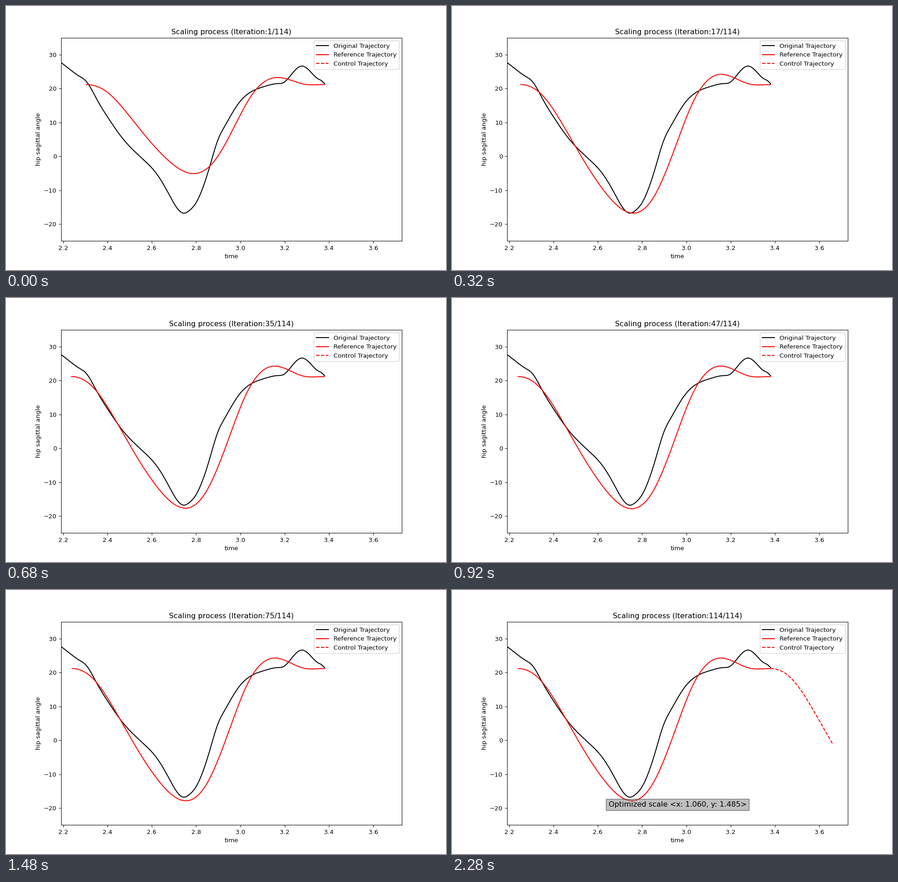
Recreate the animation shown at these times as a matplotlib script. Size 966 by 580 pixels, loop 3.48 s.

```python
import numpy as np
import matplotlib.pyplot as plt
from matplotlib.animation import FuncAnimation

DPI, W, H = 96.6, 966, 580
STEP_MS, FRAMES = 40, 87
TOTAL = 114
BEST = np.array([1.060, 1.485])  # x and y scale the search ends on
LOOK_AHEAD = 0.265               # unscaled seconds shown as control

# Key points (time, angle) of both curves
ORIGINAL = [
    (2.1905, 27.65), (2.275, 23.53), (2.302, 22.25), (2.353, 16.67),
    (2.404, 11.23), (2.466, 5.45), (2.559, -0.79), (2.620, -5.02),
    (2.672, -10.53), (2.715, -15.37), (2.742, -16.78), (2.773, -15.84),
    (2.797, -14.03), (2.830, -9.39), (2.863, -2.74), (2.898, 4.72),
    (2.929, 8.81), (2.991, 15.53), (3.052, 19.16), (3.110, 20.62),
    (3.166, 21.44), (3.196, 21.78), (3.233, 24.33), (3.277, 26.62),
    (3.320, 24.73), (3.349, 22.92), (3.365, 22.38), (3.3805, 21.44),
]
STRIDE = [
    (0, 21.16), (0.0895, 19.15), (0.182, 12.89), (0.2643, 6.19),
    (0.3672, -1.06), (0.4844, -5.12), (0.5667, -2.27), (0.6551, 7.07),
    (0.7477, 18.15), (0.8547, 23.23), (0.9843, 21.27), (1.0758, 21.16),
]


def spline(points, slope0, slope1, n=500):
    """Cubic spline through the points with given end slopes."""
    px, py = np.array(points, float).T
    h = np.diff(px)
    d = np.diff(py) / h
    a, b = np.eye(len(px)), np.zeros(len(px))
    b[0], b[-1] = slope0, slope1
    for i in range(1, len(px) - 1):
        a[i, i - 1:i + 2] = h[i], 2 * (h[i - 1] + h[i]), h[i - 1]
        b[i] = 3 * (h[i] * d[i - 1] + h[i - 1] * d[i])
    m = np.linalg.solve(a, b)

    x = np.linspace(px[0], px[-1], n)
    i = np.clip(np.searchsorted(px, x, "right") - 1, 0, len(h) - 1)
    t = (x - px[i]) / h[i]
    y = (py[i] * (1 + 2 * t) * (1 - t) ** 2 + py[i + 1] * t * t * (3 - 2 * t)
         + h[i] * t * (1 - t) * (m[i] * (1 - t) - m[i + 1] * t))
    return x, y


def settle(best, first, rate, i):
    """Line-search estimate closing in on best after i steps."""
    return best + (first - best) * rate ** i


def scales(it):
    """Scales tried at an iteration: a line search along x, then y, twice."""
    start, found = np.array([1.0, 1.0]), np.array([1.049, 1.475])
    if it == 1:
        return start
    if it <= 12:
        return settle(found[0], 1.236, 0.677, it - 3), start[1]
    if it <= 24:
        return found[0], settle(found[1], 1.236, 0.6, it - 13)
    if it <= 26:
        return 2 * found - start  # extrapolated step
    if it <= 39:
        return settle(BEST[0], 1.236, 0.6, it - 27), 1.478
    return BEST[0], settle(BEST[1], 1.478, 0.8, it - 39)


# The small margin keeps float rounding from losing a pixel row
fig, ax = plt.subplots(figsize=((W + 1e-6) / DPI, (H + 1e-6) / DPI), dpi=DPI)
ax.set(xlim=(2.19, 3.73), ylim=(-25, 35),
       xlabel="time", ylabel="hip sagittal angle")

ox, oy = spline(ORIGINAL, -49, -65)
t, angle = spline(STRIDE, 0, 0)
end, base = ox[-1], angle[-1]
lift = angle - base
ahead = t <= LOOK_AHEAD

ax.plot(ox, oy, "k-", label="Original Trajectory")
reference, = ax.plot([], [], "r-", label="Reference Trajectory")
control, = ax.plot([], [], "r--", label="Control Trajectory")
ax.legend(loc="upper right")
title = ax.set_title("")
note = ax.text(0.5, 0.1, "Optimized scale <x: {:.3f}, y: {:.3f}>".format(*BEST),
               transform=ax.transAxes, ha="center", va="center", fontsize=12,
               bbox={"facecolor": "gray", "alpha": 0.5})


def update(k):
    it = min(1 + 2 * k, TOTAL)
    done = it == TOTAL
    sx, sy = BEST if done else scales(it)
    reference.set_data(end + sx * (t - t[-1]), base + sy * lift)
    control.set_data(end + sx * t[ahead], base + sy * lift[ahead])
    control.set_visible(done)
    note.set_visible(done)
    title.set_text(f"Scaling process (Iteration:{it}/{TOTAL})")
    return reference, control, note, title


anim = FuncAnimation(fig, update, frames=FRAMES, interval=STEP_MS,
                     repeat=True, repeat_delay=0, blit=False)
plt.show()
```
